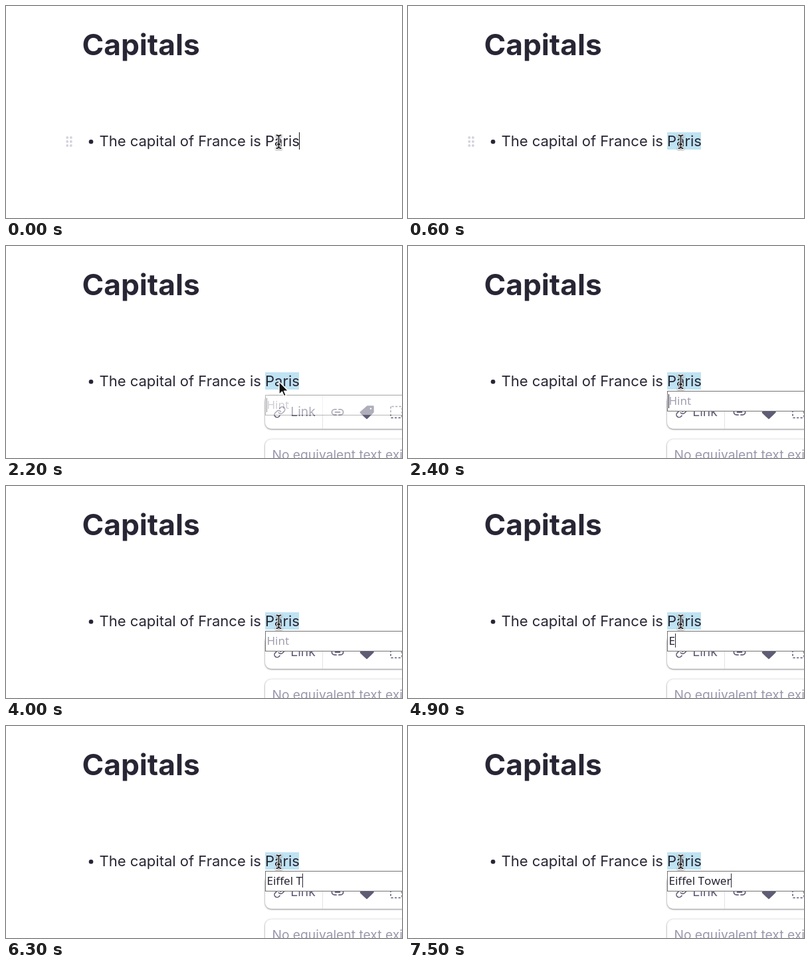
Animation of 596x319 px, one loop 8 s. Source, as an HTML page:

```html
<!DOCTYPE html>
<html lang="en">
<head>
<meta charset="utf-8">
<title>Capitals</title>
<style>
  html, body { margin: 0; width: 100%; height: 100%; overflow: hidden; background: #fff; }
  svg { display: block; width: 596px; height: 319px; }
  text { font-family: Inter, sans-serif; white-space: pre; }
  .title { font-size: 44.25px; font-weight: 700; fill: #282634; }
  .body { font-size: 22px; fill: #282634; }
  .menu { font-size: 19.25px; fill: #5f5c76; }
  .note { fill: #9a98ad; }
  .field { font-family: "Noto Sans", "Open Sans", sans-serif; font-size: 17.1px; font-kerning: none; font-variant-ligatures: none; }
  .card { fill: #fff; filter: drop-shadow(0 1.5px 1px rgba(0, 0, 0, .36)) drop-shadow(0 0 1.5px rgba(50, 45, 80, .22)); }
  .icon { fill: none; stroke: #5f5c76; stroke-linecap: round; stroke-linejoin: round; }
  #beam { filter: drop-shadow(0 1px 1px rgba(0, 0, 0, .4)); }
</style>
</head>
<body>
<svg viewBox="0 0 596 319" xmlns="http://www.w3.org/2000/svg">
  <rect width="596" height="319" fill="#fff"/>
  <text class="title" x="114.5" y="74">Capitals</text>
  <g id="handle" fill="#d5d3df"></g>
  <circle cx="128" cy="204.3" r="3.3" fill="#282634"/>
  <rect id="selection" y="190" height="26" fill="#bfe3f3"/>
  <text class="body" x="140.5" y="211">The capital of France is Paris</text>
  <rect id="bodyCaret" x="441" y="190" width="1" height="26" fill="#111"/>

  <g id="menu">
    <rect class="card" x="390" y="225" width="260" height="50" rx="9"/>
    <path d="M476.5 225V275" stroke="#e4e3ea"/>
    <g class="icon">
      <g transform="translate(402.4 240.5) scale(.79)" stroke-width="2">
        <path d="M10 13a5 5 0 0 0 7.54.54l3-3a5 5 0 0 0-7.07-7.07l-1.72 1.71"/>
        <path d="M14 11a5 5 0 0 0-7.54-.54l-3 3a5 5 0 0 0 7.07 7.07l1.71-1.71"/>
      </g>
      <path d="M497 245.8h-2.4a4.2 4.2 0 0 0 0 8.4h2.4M501 245.8h2.4a4.2 4.2 0 0 1 0 8.4h-2.4M495.5 250h7" stroke-width="1.8"/>
      <path d="M552.5 241.5V250L543 259.2L533.8 250.5L544 241.5Z" fill="#5f5c76" stroke-width="2.4"/>
      <circle cx="549" cy="244.7" r="1.2" fill="#fff" stroke="none"/>
      <rect x="579" y="241.5" width="17" height="17" rx="1.5" stroke-width="1.6" stroke-linecap="butt" stroke-dasharray="3.2 2.3"/>
    </g>
    <text class="menu" x="428.3" y="256.3">Link</text>
    <rect class="card" x="390" y="291" width="260" height="60" rx="9"/>
    <text class="menu note" x="400.4" y="321">No equivalent text exists</text>
  </g>

  <g id="input">
    <rect x="390.5" y="218.5" width="260" height="30" fill="#fff" stroke="#727272"/>
    <text id="value" class="field" x="392.4" y="239"></text>
    <rect id="caret" width="1" height="21" fill="#282634"/>
  </g>

  <g id="beam" fill="none" stroke-linecap="square">
    <path id="beamEdge" stroke="#fff" stroke-width="3.8"/>
    <path id="beamCore" stroke="#222" stroke-width="1.8"/>
  </g>
  <path id="arrow" d="M411 204V223.5L415.5 219.3L418.5 226L421.5 224.7L418.6 218.2H425Z"
    fill="#111" stroke="#fff" stroke-width="1.5" stroke-linejoin="round"/>
</svg>
<script>
const $ = id => document.getElementById(id);
const show = (id, on) => $(id).setAttribute("visibility", on ? "visible" : "hidden");
const set = (id, attrs) => {
  for (const key in attrs) $(id).setAttribute(key, attrs[key]);
};

const LOOP = 8000;
const PHRASE = "Eiffel Tower";
const KEY_TIMES = [4900, 5100, 5300, 5500, 5600, 5700, 6100, 6300, 6800, 7000, 7300, 7500];

for (let i = 0; i < 6; i++) {
  const dot = document.createElementNS("http://www.w3.org/2000/svg", "circle");
  dot.setAttribute("cx", i % 2 ? 97.8 : 92.2);
  dot.setAttribute("cy", 198 + 6 * Math.floor(i / 2));
  dot.setAttribute("r", 2);
  $("handle").append(dot);
}

const beamPath = "M407.5 194.5Q410 194.5 410.5 196.5Q411 194.5 413.5 194.5" +
  "M410.5 196.5V212M407.5 214Q410 214 410.5 212Q411 214 413.5 214M409 208H412";
set("beamEdge", { d: beamPath });
set("beamCore", { d: beamPath });

function drawInput(t) {
  show("input", t >= 2200);
  const step = t < 2300 ? 0 : t < 2400 ? 1 : 2;
  set("input", { transform: `translate(0 ${[6, 2, 0][step]})`, opacity: [0.5, 0.85, 1][step] });

  const typed = PHRASE.slice(0, KEY_TIMES.filter(k => k <= t).length);
  const value = $("value");
  value.textContent = typed || "Hint";
  set("value", { fill: typed ? "#282634" : "#a09eae" });

  const x = typed ? Math.floor(392.55 + value.getComputedTextLength()) : 392;
  set("caret", { x, y: typed ? 222 : 223 });
  const blinkOn = Math.floor((t - 2200) / 600) % 2 === 0;
  show("caret", t >= 2200 && (typed || blinkOn));
}

function draw(t) {
  show("handle", t < 1500);
  show("bodyCaret", t < 400);
  show("selection", t >= 400);
  const left = t < 600 ? 416 : 390;
  set("selection", { x: left, width: 441 - left });
  show("menu", t >= 700);
  const pointing = t >= 2000 && t < 2400;
  show("beam", !pointing);
  show("arrow", pointing);
  drawInput(t);
}

const start = performance.now();
function tick() {
  draw((performance.now() - start) % LOOP);
  requestAnimationFrame(tick);
}
tick();
</script>
</body>
</html>
```
